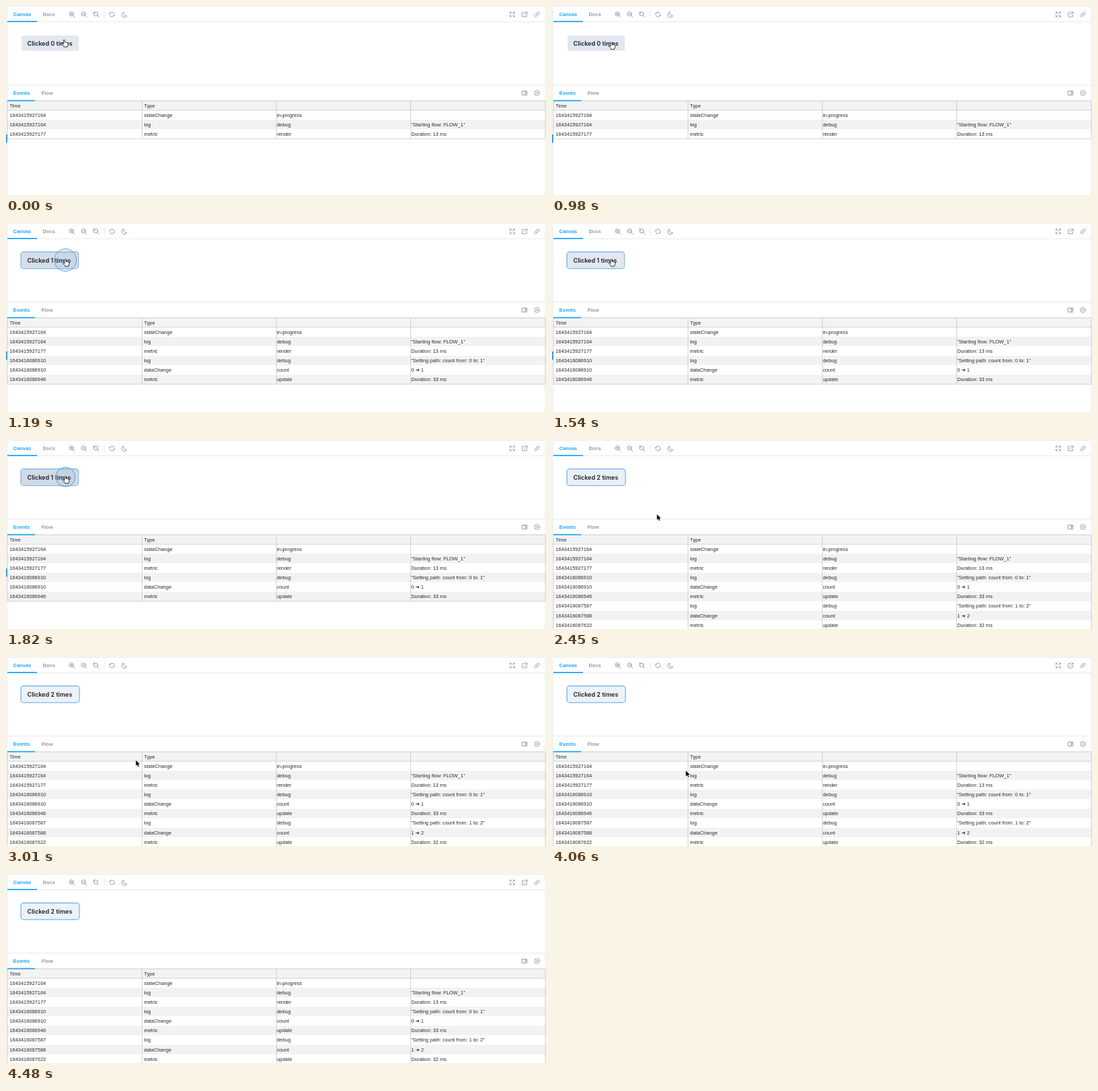
Animation of 800x281 px, one loop 5.04 s. Source, as an HTML page:

```html
<!DOCTYPE html>
<html lang="en">
<head>
<meta charset="utf-8">
<title>Click counter with event log</title>
<style>
  html, body { margin: 0; width: 100%; height: 100%; overflow: hidden; background: #fff; }
  svg { display: block; width: 100%; height: 100%; }
  text { font-family: "Liberation Sans", "DejaVu Sans", sans-serif; }
  .tab { font-size: 7.45px; font-weight: 700; fill: #999; }
  .on { fill: #1ea7fd; }
  .cell { font-size: 7.45px; fill: #2b2b2b; }
  .icon { fill: none; stroke: #8f8f8f; stroke-width: .85; stroke-linecap: round; stroke-linejoin: round; }
  .rule { stroke: #e4e4e4; stroke-width: .8; }
  .grid { fill: none; stroke: #b9b9b9; stroke-width: .6; }
  #label { font: 600 9px Inter, "Liberation Sans", sans-serif; fill: #1a202c; }
</style>
</head>
<body>
<svg viewBox="0 0 800 281" preserveAspectRatio="none">
  <rect width="800" height="281" fill="#f8fafc"/>
  <rect x="1.5" y=".5" width="797.5" height="300" rx="2" fill="#fff" stroke="#e4e7ea" stroke-width=".8"/>

  <path class="rule" d="M2 23.5H799M2 117.5H799M2 141H799M145.5 7V18"/>
  <text class="tab on" x="10.8" y="15.3">Canvas</text>
  <text class="tab" x="54.5" y="15.3">Docs</text>
  <text class="tab on" x="10.8" y="132.2">Events</text>
  <text class="tab" x="52.5" y="132.2">Flow</text>
  <rect class="on" x="2" y="22.2" width="44" height="1.8"/>

  <g class="icon">
    <g id="lens"><circle cx="96.8" cy="11.8" r="3.1"/><path d="M99.2 14.2L101.6 16.6"/></g>
    <use href="#lens" x="18"/><use href="#lens" x="36"/>
    <path d="M95.3 11.8H98.3M96.8 10.3V13.3M113.3 11.8H116.3"/>
    <path d="M130 8.6V10.6H132"/>
    <path d="M153.6 11.8A3.5 3.5 0 0 1 160.3 11.2M160.4 13.2A3.5 3.5 0 0 1 153.7 13.8M152.6 11L153.6 12L154.7 11.1M159.3 13.9L160.4 13L161.4 14"/>
    <path d="M174.2 9.2A3.9 3.9 0 1 0 179 14.4A4.1 4.1 0 0 1 174.2 9.2Z"/>
    <path d="M746.6 11V9H748.6M751.4 9H753.4V11M753.4 14V16H751.4M748.6 16H746.6V14M747 9.4L749 11.4M753 9.4L751 11.4M753 15.6L751 13.6M747 15.6L749 13.6"/>
    <path d="M767.5 9.6H764.8V16H771.4V13.2M769 9H772V12M771.8 9.2L767.8 13.2"/>
    <path d="M785.6 13.6A1.7 1.7 0 0 0 788 13.5L789.6 11.9A1.7 1.7 0 0 0 787.2 9.5L786.2 10.5M787.4 11.5A1.7 1.7 0 0 0 785 11.6L783.4 13.2A1.7 1.7 0 0 0 785.8 15.6L786.8 14.6"/>
    <path d="M764.8 126.5H771.8V132.3H764.8ZM769.2 126.5V132.3M770.1 128.2H771M770.1 129.7H771"/>
    <circle cx="786.6" cy="129.4" r="3.7"/>
    <path d="M785.2 128L788 130.8M788 128L785.2 130.8"/>
  </g>

  <g id="log"></g>
  <rect class="on" x="2" y="139.8" width="41" height="1.7"/>
  <rect class="on" id="mark" y="191" width="2" height="12.3"/>

  <rect id="ring" x="22.15" y="43.15" height="24.5" rx="4" fill="none" stroke="#4299e1" stroke-opacity=".6" stroke-width="1.7"/>
  <rect id="button" x="23" y="44" height="22.8" rx="3.4"/>
  <text id="label" x="31.6" y="58.9"></text>
  <circle id="pulse" cx="88" cy="55" fill="#5c9be0" fill-opacity=".1" stroke="#5c9be0" stroke-width="1"/>

  <g id="cursor">
    <path id="hand" fill="#fff" stroke="#111" stroke-width=".85" stroke-linejoin="round"
      d="M-1 1Q0-1 1 1L1.4 4Q2.4 3.2 3.2 4.3Q4.4 3.6 5 5Q6.2 4.9 6 6.5Q6 8.5 5 9.5V10.8H-.2V10Q-2 8.2-3.6 6.2Q-3.4 4.8-2 5.5L-.6 6.8Z"/>
    <path id="arrow" fill="#000" stroke="#fff" stroke-width=".9" paint-order="stroke"
      d="M0 0V8.2L1.9 6.5L3.2 9.4L4.6 8.8L3.3 6H5.9Z"/>
  </g>
</svg>
<script>
const LOOP = 5040, STEP = 70;
const CLICKS = [1050, 1730];      // press times
const COUNT_DELAY = 140;          // press to new count
const COLS = [2, 201.5, 400.5, 599.5];
const ROW_H = 14.13, HEAD_Y = 141, BODY_Y = 155;
const EVENTS = [
  ['1643415927164', 'stateChange', 'in-progress', ''],
  ['1643415927164', 'log', 'debug', '"Starting flow: FLOW_1"'],
  ['1643415927177', 'metric', 'render', 'Duration: 13 ms'],
  ['1643416086910', 'log', 'debug', '"Setting path: count from: 0 to: 1"'],
  ['1643416086910', 'dataChange', 'count', '0 ➜ 1'],
  ['1643416086946', 'metric', 'update', 'Duration: 33 ms'],
  ['1643416087587', 'log', 'debug', '"Setting path: count from: 1 to: 2"'],
  ['1643416087588', 'dataChange', 'count', '1 ➜ 2'],
  ['1643416087622', 'metric', 'update', 'Duration: 32 ms']
];
// time, x, y of the pointer tip
const PATH = [
  [0, 86, 50], [70, 86.8, 51.8], [140, 87.6, 53.5], [2170, 87.6, 53.5],
  [2240, 94, 58.5], [2310, 110, 73], [2380, 134, 93.5], [2450, 155.5, 110.5],
  [2590, 174, 129], [2800, 187, 146], [3010, 192.5, 153.5], [3290, 194, 156],
  [3990, 194, 156], [4200, 207, 195], [4480, 240, 300]
];
// time, red, green, blue of the button
const FILL = [
  [0, 226, 232, 240], [1050, 226, 232, 240], [1120, 208, 217, 228], [1330, 226, 232, 240],
  [1730, 226, 232, 240], [1800, 208, 217, 228], [2010, 226, 232, 240],
  [2310, 226, 232, 240], [2520, 237, 242, 247]
];

const $ = id => document.getElementById(id);
const clamp = v => Math.max(0, Math.min(1, v));
const show = (id, on) => $(id).setAttribute('visibility', on ? 'visible' : 'hidden');

function add(parent, tag, attrs, text = '') {
  const el = document.createElementNS('http://www.w3.org/2000/svg', tag);
  for (const k in attrs) el.setAttribute(k, attrs[k]);
  el.textContent = text;
  return parent.appendChild(el);
}

function sample(track, t) {
  const i = track.findIndex(k => k[0] > t);
  if (i < 0) return track[track.length - 1].slice(1);
  const a = track[i - 1], b = track[i], p = (t - a[0]) / (b[0] - a[0]);
  return a.slice(1).map((v, n) => v + (b[n + 1] - v) * p);
}

function addRow(parent, cells, y, h, fill) {
  const g = add(parent, 'g', {});
  add(g, 'rect', { x: 2, y, width: 797, height: h, fill });
  cells.forEach((s, i) => {
    const x = COLS[i] + (i === 0 ? 3.4 : i === 1 ? 3 : .7);
    add(g, 'text', { class: 'cell', x, y: y + h / 2 + 2.6 }, s);
  });
  return g;
}

const log = $('log');
addRow(log, ['Time', 'Type', '', ''], HEAD_Y, BODY_Y - HEAD_Y, '#f3f3f3');
const rows = EVENTS.map((e, i) => addRow(log, e, BODY_Y + i * ROW_H, ROW_H, i % 2 ? '#f2f2f2' : '#fff'));
const grid = add(log, 'path', { class: 'grid' });

function drawPulse(t) {
  const age = t - CLICKS[t < CLICKS[1] ? 0 : 1];
  show('pulse', age >= 0 && age < 420);
  $('pulse').setAttribute('r', 8 + 8.5 * clamp((age + STEP) / 210));
  $('pulse').setAttribute('opacity', 1 - clamp((age - 230) / 190));
}

function draw(t) {
  const count = CLICKS.filter(c => t >= c + COUNT_DELAY).length;
  const shown = 3 + count * 3, end = BODY_Y + shown * ROW_H;
  rows.forEach((r, i) => r.setAttribute('visibility', i < shown ? 'visible' : 'hidden'));
  grid.setAttribute('d', `M2 ${HEAD_Y}H799V${end}H2ZM2 ${BODY_Y}H799` +
    COLS.slice(1).map(x => `M${x} ${HEAD_Y}V${end}`).join(''));

  const w = count === 1 ? 83.4 : 84.8;
  $('label').textContent = `Clicked ${count} times`;
  $('button').setAttribute('width', w);
  $('button').setAttribute('fill', `rgb(${sample(FILL, t).map(Math.round)})`);
  $('ring').setAttribute('width', w + 1.7);
  show('ring', t >= CLICKS[0] + STEP);
  show('mark', t < 2030);
  drawPulse(t);

  const [x, y] = sample(PATH, t);
  $('cursor').setAttribute('transform', `translate(${x} ${y})`);
  show('hand', t < 2310);
  show('arrow', t >= 2310 && t < 4480);
}

const start = performance.now();
function tick() {
  const t = (performance.now() - start) % LOOP;
  draw(Math.floor(t / STEP) * STEP);
  requestAnimationFrame(tick);
}
tick();
</script>
</body>
</html>
```
